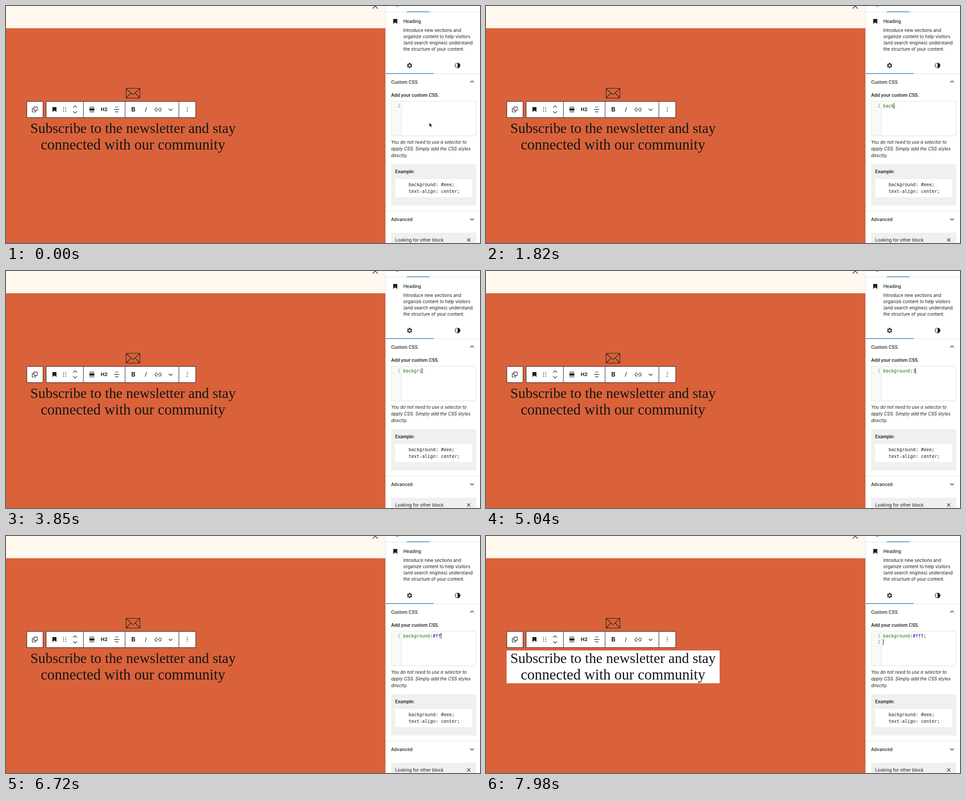
Recreate the animation shown at these times as an HTML page. Size 1057x530 px, loop 8 s.

```html
<!DOCTYPE html>
<html lang="en">
<head>
<meta charset="utf-8">
<title>Custom CSS editor</title>
<style>
  html, body { margin: 0; width: 100%; height: 100%; overflow: hidden; background: #fff; }
  svg { display: block; width: 100vw; height: 100vh; }
  text { white-space: pre; }
  .ui { font: 9.9px Inter, sans-serif; fill: #1e1e1e; }
  .medium { font-weight: 500; }
  .bold { font-weight: 600; }
  .italic { font-style: italic; }
  .mono { font: 10px "DejaVu Sans Mono", monospace; fill: #1e1e1e; }
  .number { fill: #999; }
  .serif { font-family: "Liberation Serif", serif; fill: #151515; text-anchor: middle; }
  .line { fill: none; stroke: #1e1e1e; stroke-width: 1.2; }
  .rule { fill: none; stroke: #e0e0e0; }
  .accent { fill: none; stroke: #2f86b7; stroke-width: 1.5; }
  .card { fill: #fff; stroke: #1e1e1e; }
</style>
</head>
<body>
<svg viewBox="0 0 1057 530" xmlns="http://www.w3.org/2000/svg">
  <defs>
    <path id="down" class="line" d="M-4 -2 L0 2 L4 -2"/>
    <path id="up" class="line" d="M-4 2 L0 -2 L4 2"/>
    <path id="bookmark" d="M0 0 H9 V11 L4.5 7.5 L0 11 Z" fill="#1e1e1e"/>
  </defs>

  <rect width="847" height="530" fill="#d9623a"/>
  <rect width="847" height="49.7" fill="#fff8ee"/>
  <path class="line" d="M817.5 6 L823.3 0 L829 6 M817.5 -6 L823.3 0 L829 -6"/>

  <g class="line">
    <rect x="268" y="184.2" width="30.5" height="21.6"/>
    <path d="M268 184.5 L283.2 198.5 L298.5 184.5 M268 205.5 L278.5 194.5 M298.5 205.5 L288 194.5"/>
  </g>

  <rect id="highlight" x="46" y="256" width="475" height="73.3" fill="#fff"/>
  <text class="serif" x="283.2" y="284" font-size="31.9">Subscribe to the newsletter and stay</text>
  <text class="serif" x="283.2" y="320.7" font-size="33">connected with our community</text>

  <g id="toolbar">
    <rect class="card" x="46.5" y="213.5" width="36" height="36"/>
    <rect class="card" x="89.5" y="213.5" width="333.5" height="36"/>
    <path class="line" style="stroke-width:1" d="M172.5 213 V249 M265.5 213 V249 M385.5 213 V249"/>
    <g class="line">
      <rect x="62.2" y="225.8" width="7.6" height="7.6" rx=".8"/>
      <path d="M62 229 H59 Q58.6 229 58.6 229.6 V236.4 Q58.6 237 59.2 237 H65.8 Q66.4 237 66.4 236.4 V233.5"/>
    </g>
    <use href="#bookmark" x="103.5" y="226"/>
    <g id="grip" fill="#1e1e1e"></g>
    <use href="#up" x="154" y="225"/>
    <use href="#down" x="154" y="237.5"/>
    <path d="M186 225.5 H197 V226.8 H186 Z M186 228.8 H197 V234 H186 Z M186 236 H197 V237.3 H186 Z" fill="#1e1e1e"/>
    <text class="ui" x="218.8" y="235.2" text-anchor="middle" style="font-size:11px;font-weight:700">H2</text>
    <path class="line" d="M243 226 H250.5 M240.8 231.3 H252.8 M243 236.7 H250.5"/>
    <text class="ui" x="284" y="236.2" text-anchor="middle" style="font-size:13.5px;font-weight:700">B</text>
    <path class="line" d="M313.2 226.5 L310.4 236.3"/>
    <path class="line" d="M337.8 228 H335.8 A3.4 3.4 0 0 0 335.8 234.8 H337.8 M341 228 H342.6 A3.4 3.4 0 0 1 342.6 234.8 H341 M336.2 231.4 H342.4"/>
    <use href="#down" x="367" y="232"/>
    <g id="more" fill="#1e1e1e"></g>
  </g>

  <rect x="846.5" width="211" height="530" fill="#fff"/>
  <path class="rule" d="M846.5 0 V530 M847 13.5 H1057 M847 151.5 H1057 M847 458.5 H1057"/>
  <path class="accent" d="M894 13 H944.5 M847 151 H953.5"/>
  <path class="line" d="M870.5 0 Q873 1.2 875.3 -.5"/>

  <use href="#bookmark" x="863.5" y="29"/>
  <g id="labels"></g>

  <g transform="translate(900 133)">
    <circle class="line" r="3.5" stroke-width="1.8" style="stroke-width:1.9"/>
    <path id="teeth" class="line" style="stroke-width:2.4"/>
  </g>
  <circle class="line" cx="1007" cy="133" r="5.5"/>
  <path d="M1007 127.5 A5.5 5.5 0 0 1 1007 138.5 Z" fill="#1e1e1e"/>
  <use href="#up" x="1039.3" y="169.3"/>
  <use href="#down" x="1039.3" y="477"/>

  <rect x="859.5" y="213" width="188.7" height="77.3" rx="1.5" fill="#fff" stroke="#ddd"/>
  <rect x="860" y="213.5" width="21.5" height="76.3" fill="#f9f9f9"/>
  <path class="rule" d="M881.8 213.5 V290" stroke="#ddd"/>
  <text class="mono number" x="873" y="227">1</text>
  <text id="second" class="mono number" x="873" y="241">2</text>
  <text id="code" class="mono" x="885.4" y="227"></text>
  <rect id="caret" width="1.1" height="13" fill="#111"/>

  <rect x="858.7" y="354" width="190" height="92" fill="#f0f0f0"/>
  <rect x="867.7" y="387" width="171.6" height="40.3" rx="1.5" fill="#fff"/>
  <text class="ui bold" x="867.7" y="373.7">Example:</text>
  <text class="mono" x="897.7" y="403.3">background: #eee;</text>
  <text class="mono" x="897.7" y="417.6">text-align: center;</text>

  <rect x="858.7" y="507" width="190" height="23" fill="#f0f0f0"/>
  <text class="ui" x="867.7" y="526.5">Looking for other block</text>
  <path class="line" d="M1028.2 519.7 L1035.4 526.9 M1035.4 519.7 L1028.2 526.9"/>

  <path id="pointer" d="M944 260.7 V270.2 L946.2 268.2 L947.8 271.8 L949.5 271 L948 267.6 H950.8 Z"
        fill="#111" stroke="#fff" stroke-width=".7"/>
</svg>
<script>
  const LOOP = 8000, CHAR = 6.02;
  const byId = id => document.getElementById(id);
  const show = (id, on) => byId(id).setAttribute("visibility", on ? "visible" : "hidden");
  const dots = (id, xs, ys) => byId(id).innerHTML = xs.flatMap(x =>
    ys.map(y => `<circle cx="${x}" cy="${y}" r="1"/>`)).join("");

  dots("grip", [128.4, 133.2], [227, 231.3, 235.6]);
  dots("more", [404.2], [227, 231.4, 235.8]);

  byId("teeth").setAttribute("d", Array.from({ length: 6 }, (_, i) => {
    const a = (i + .5) * Math.PI / 3;
    const at = r => `${r * Math.cos(a)} ${r * Math.sin(a)}`;
    return `M${at(4)}L${at(6)}`;
  }).join(""));

  // Blocks of text: style, x, first baseline, line height, lines
  const blocks = [
    ["medium", 886, 38.3, 14, "Heading"],
    ["", 886, 57.5, 14, "Introduce new sections and", "organize content to help visitors",
      "(and search engines) understand", "the structure of your content."],
    ["medium", 858.7, 173.6, 14, "Custom CSS"],
    ["bold", 858.7, 202.6, 14, "Add your custom CSS."],
    ["italic", 858.7, 307.7, 15, "You do not need to use a selector to",
      "apply CSS. Simply add the CSS styles", "directly."],
    ["medium", 858.7, 480.5, 14, "Advanced"],
  ];
  byId("labels").innerHTML = blocks.map(([style, x, y, step, ...lines]) =>
    lines.map((s, i) => `<text class="ui ${style}" x="${x}" y="${y + i * step}">${s}</text>`).join("")
  ).join("");

  // Editor states: start time, content, caret visible
  const states = [
    [0, "", false], [210, "", true], [770, "", false], [1260, "", true],
    [1400, "b", true], [1540, "ba", true], [1680, "bac", true], [1820, "back", true],
    [2100, "backg", true], [2240, "backgr", true], [2800, "backgr", false],
    [3080, "backgri", true], [3220, "backgriu", true], [3360, "backgriun", true],
    [3710, "backgriu", true], [3850, "backgri", true], [3990, "backgr", true],
    [4130, "backgro", true], [4270, "backgrou", true], [4410, "backgroun", true],
    [4550, "background", true], [4760, "background:", true], [5040, "background:3", true],
    [5600, "background:3", false], [6090, "background:", true], [6300, "background:#", true],
    [6440, "background:#f", true], [6580, "background:#ff", true], [6790, "background:#fff", true],
    [7350, "background:#fff", false], [7630, "background:#fff;", true],
    [7980, "background:#fff;\n", true],
  ];

  const tokenColor = token =>
    /^[a-z]/.test(token) ? "#117700" : token[0] === "#" ? "#3300aa" : /\d/.test(token) ? "#116644" : "#111";

  let current;
  function draw(time) {
    const state = states.findLast(([start]) => start <= time);
    if (state === current) return;
    current = state;
    const [start, content, caretOn] = state;
    const [first, second] = content.split("\n");
    const newLine = second !== undefined;
    const tokens = first.match(/#?\w+|./g) || [];
    byId("code").innerHTML = tokens.map(t => `<tspan fill="${tokenColor(t)}">${t}</tspan>`).join("");
    byId("caret").setAttribute("x", 885.3 + CHAR * (newLine ? 0 : first.length));
    byId("caret").setAttribute("y", newLine ? 230.7 : 216.7);
    show("caret", caretOn);
    show("second", newLine);
    show("highlight", content.includes("#fff"));
    show("pointer", start < 1400);
  }

  function tick() {
    draw(performance.now() % LOOP);
    requestAnimationFrame(tick);
  }
  tick();
</script>
</body>
</html>
```
